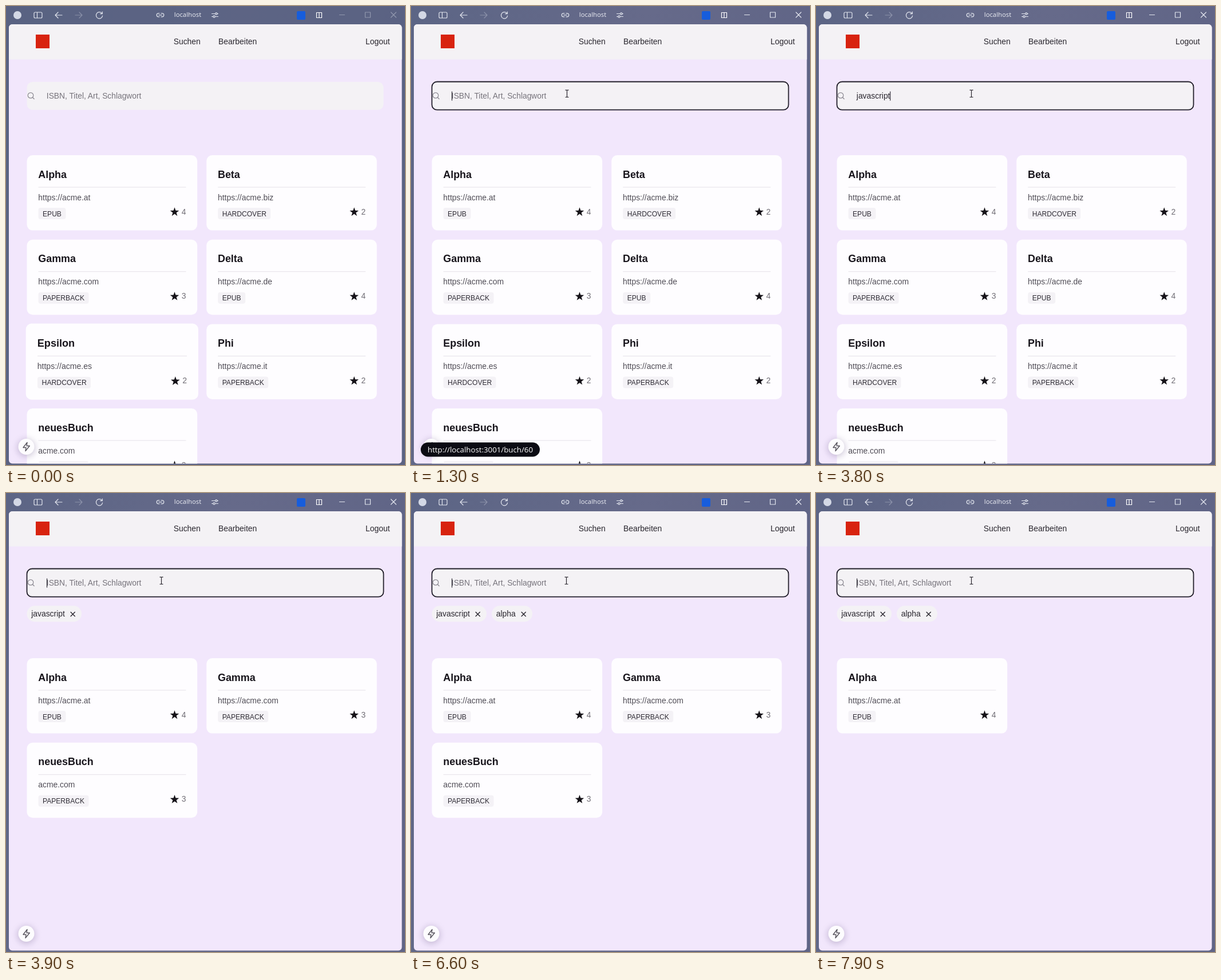
These frames come from a looping animation (697x803 px, 8 s). An HTML page:

```html
<!DOCTYPE html>
<html lang="de">
<head>
<meta charset="utf-8">
<title>Buchsuche</title>
<style>
  html, body { margin: 0; width: 100%; height: 100%; overflow: hidden; background: #5e6584; }
  svg { display: block; width: 697px; height: 803px; }
  text { font: 13.9px "Liberation Sans", Arial, sans-serif; fill: #29262e; white-space: pre; }
  .title { font-size: 17.9px; font-weight: bold; fill: #18151c; }
  .url { fill: #4f4c55; }
  .badge { font-size: 12.1px; fill: #302d36; }
  .rating { fill: #6f6c74; text-anchor: end; }
  .ui { font-family: "Open Sans", sans-serif; fill: #eceef4; }
  .line { fill: none; stroke: #e2e5ee; stroke-width: 1.2; stroke-linecap: round; stroke-linejoin: round; }
</style>
</head>
<body>
<svg viewBox="0 0 697 803">
  <defs>
    <linearGradient id="frame" x2="1" y2="0.3">
      <stop offset="0" stop-color="#5c6585"/>
      <stop offset=".55" stop-color="#666a8a"/>
      <stop offset="1" stop-color="#5f6486"/>
    </linearGradient>
    <clipPath id="page"><rect x="5" y="32" width="686.5" height="768.5" rx="6"/></clipPath>
    <filter id="soft" x="-100%" y="-100%" width="300%" height="300%"><feGaussianBlur stdDeviation="6"/></filter>
  </defs>

  <rect width="697" height="803" fill="url(#frame)"/>
  <rect id="idle" width="697" height="803" fill="#576280" opacity=".6"/>

  <g class="line">
    <circle cx="20" cy="16" r="7" fill="#d3d8e5" stroke="none"/>
    <path d="M51 11h10a2 2 0 0 1 2 2v6a2 2 0 0 1-2 2H51a2 2 0 0 1-2-2v-6a2 2 0 0 1 2-2zM54.5 11v10"/>
    <path d="M98 16H86l5-5M86 16l5 5"/>
    <path d="M121 16h12l-5-5M133 16l-5 5" opacity=".35"/>
    <path d="M167.7 13.2A5.6 5.6 0 1 0 168.6 17M168.3 10v3.6h-3.6"/>
    <path d="M268 12.8h-1.8a3 3 0 0 0 0 6h1.8M271 12.8h1.8a3 3 0 0 1 0 6H271M266.8 15.8h5.4"/>
    <path d="M359.5 13.5h6M369 13.5h1.5M359.5 18.5h2M366 18.5h4.5"/>
    <circle cx="367.3" cy="13.5" r="1.7"/><circle cx="363.5" cy="18.5" r="1.7"/>
    <rect x="508" y="9" width="15" height="15" rx="2" fill="#175ddc" stroke="none"/>
    <path d="M542.5 11.5h9v9h-9zM547 11.5v9" stroke="#fff"/>
    <g id="controls"><path d="M582.5 15.5h9M627.5 11h9v9h-9zM672.5 11l9 9M681.5 11l-9 9"/></g>
  </g>
  <text class="ui" x="293.8" y="19" style="font-size:11.3px">localhost</text>

  <g clip-path="url(#page)">
    <rect x="5" y="32" width="687" height="769" fill="#f2e7fc"/>
    <rect x="5" y="32" width="687" height="61.5" fill="#f4f2f5"/>
    <rect x="52" y="50" width="24" height="24" fill="#d8230f"/>
    <text x="292.7" y="66.5">Suchen</text>
    <text x="371" y="66.5">Bearbeiten</text>
    <text x="628" y="66.5">Logout</text>

    <rect x="36.5" y="132.7" width="623" height="49" rx="10" fill="#f4f2f5"/>
    <rect id="focus" x="36.5" y="132.5" width="623" height="49.2" rx="9" fill="none" stroke="#211e29" stroke-width="1.8"/>
    <g fill="none" stroke="#8b8891" stroke-width="1.2"><circle cx="43" cy="156.4" r="4.8"/><path d="M46.5 160l3 3"/></g>
    <text id="hint" x="70.8" y="161.8" style="font-size:13.8px;fill:#76737b">ISBN, Titel, Art, Schlagwort</text>
    <text id="value" x="70.8" y="161.8"></text>
    <rect id="caret" y="149.5" width="1.1" height="16" fill="#211e29"/>

    <g id="tags"></g>
    <g id="cards"></g>

    <circle cx="35.5" cy="773" r="15" fill="#6a5a88" opacity=".35" filter="url(#soft)"/>
    <circle cx="35.5" cy="771" r="14" fill="#fdfcfe"/>
    <path d="M37 763.5l-7 9h5l-1 6 7.3-9h-5.2z" fill="none" stroke="#57545d" stroke-width="1.4" stroke-linejoin="round"/>

    <g id="status">
      <rect x="17" y="763.5" width="208" height="25" rx="12.5" fill="#0b0b13"/>
      <text class="ui" x="29" y="780.7" style="font-size:13.27px;fill:#fff">http://localhost:3001/buch/60</text>
    </g>
  </g>

  <path id="beam" d="M-3-6.2h2.2l.8.7.8-.7H3M0-5.5v11M-3 6.2h2.2l.8-.7.8.7H3" fill="none" stroke="#29262e" stroke-width="1.2"/>
</svg>

<script>
const LOOP = 8000, BLINK = 530;
const FOCUS = 1290, SUBMIT1 = 3860, SUBMIT2 = 6450, FILTER2 = 6680;
const entries = [
  { word: 'javascript', start: 2500, step: 124, submit: SUBMIT1 },
  { word: 'alpha', start: 5700, step: 145, submit: SUBMIT2 }
];
const alpha = ['Alpha', 'https://acme.at', 'EPUB', 4];
const gamma = ['Gamma', 'https://acme.com', 'PAPERBACK', 3];
const neu = ['neuesBuch', 'acme.com', 'PAPERBACK', 3];
const all = [
  alpha, ['Beta', 'https://acme.biz', 'HARDCOVER', 2],
  gamma, ['Delta', 'https://acme.de', 'EPUB', 4],
  ['Epsilon', 'https://acme.es', 'HARDCOVER', 2], ['Phi', 'https://acme.it', 'PAPERBACK', 2],
  neu
];
const EPSILON = 4, PHI = 5;
const badgeWidth = { EPUB: 48, HARDCOVER: 92, PAPERBACK: 88 };

const $ = id => document.getElementById(id);
const show = (id, on) => $(id).setAttribute('opacity', +on);
const ramp = (t, from, to) => Math.min(1, Math.max(0, (t - from) / (to - from)));
const ease = p => p * p * (3 - 2 * p);

const star = Array.from({ length: 10 }, (_, i) => {
  const r = i % 2 ? 3.3 : 8.2, a = i * Math.PI / 5;
  return `${(258 + r * Math.sin(a)).toFixed(2)},${(99.5 - r * Math.cos(a)).toFixed(2)}`;
}).join(' ');

function card([title, url, kind, rating], i, top, scale) {
  const x = 36.5 + i % 2 * 313.7, y = top + (i >> 1) * 147.7;
  return `<g transform="translate(${x} ${y}) translate(148.8 65.8) scale(${scale}) translate(-148.8 -65.8)">
    <rect width="297.6" height="131.6" rx="10" fill="#fefdff"/>
    <text class="title" x="19.8" y="39.7">${title}</text>
    <path d="M20 56h258" stroke="#e4e1e8"/>
    <text class="url" x="19.8" y="78.6">${url}</text>
    <rect x="20" y="92" width="${badgeWidth[kind]}" height="20" rx="4" fill="#f4f2f6"/>
    <text class="badge" x="27.5" y="106.6">${kind}</text>
    <polygon points="${star}" fill="#151218"/>
    <text class="rating" x="278" y="103.6">${rating}</text></g>`;
}

function tag(word, x, width) {
  const cx = x + width - 15.3;
  return `<rect x="${x}" y="197.3" width="${width}" height="28" rx="14" fill="#f4f2f5"/>
    <text x="${x + 7.7}" y="216.3">${word}</text>
    <path d="M${cx - 4} 208l8 8m0-8l-8 8" stroke="#29262e" stroke-width="1.4"/>`;
}

const drawn = {};
function fill(id, html) {
  if (drawn[id] !== html) $(id).innerHTML = drawn[id] = html;
}

function typed(t) {
  const e = entries.find(e => t >= e.start && t < e.submit);
  return e ? e.word.slice(0, 1 + Math.floor((t - e.start) / e.step)) : '';
}

function draw(t) {
  show('idle', t < 500 ? 0.6 : 0);
  show('controls', t < 500 ? 0.4 : 1);

  // search field
  const text = typed(t);
  $('value').textContent = text;
  show('hint', !text);
  show('focus', t >= FOCUS);
  const reset = t < 2500 ? FOCUS : t < 5700 ? 3620 : SUBMIT2;
  show('caret', t >= FOCUS && Math.floor(Math.max(0, t - reset) / BLINK) % 2 === 0);
  $('caret').setAttribute('x', 71 + (text ? $('value').getComputedTextLength() - 0.5 : 0));

  // results
  fill('tags', (t >= SUBMIT1 ? tag('javascript', 36.5, 95.5) : '') +
               (t >= SUBMIT2 ? tag('alpha', 141, 71) : ''));
  const list = t < SUBMIT1 ? all : t < FILTER2 ? [alpha, gamma, neu] : [alpha];
  const top = t < SUBMIT1 ? 261 : 289;
  const hover = i => t >= SUBMIT1 ? 0
    : i === EPSILON ? 0.6 * (1 - ease(ramp(t, 0, 120)))
    : i === PHI ? ease(ramp(t, 100, 300)) - ease(ramp(t, 800, 1000)) : 0;
  fill('cards', list.map((c, i) => card(c, i, top, 1 + 0.02 * hover(i))).join(''));

  show('status', ramp(t, 700, 850) - ramp(t, 1500, 1700));

  // pointer
  const p = ease(ramp(t, 950, 1250));
  show('beam', t >= 950);
  const x = 290 - 17.5 * p - ease(ramp(t, 1500, 1700));
  $('beam').setAttribute('transform', `translate(${x} ${178 - 24.7 * p})`);
}

const begin = performance.now();
function tick() {
  draw((performance.now() - begin) % LOOP);
  requestAnimationFrame(tick);
}
tick();
</script>
</body>
</html>
```
